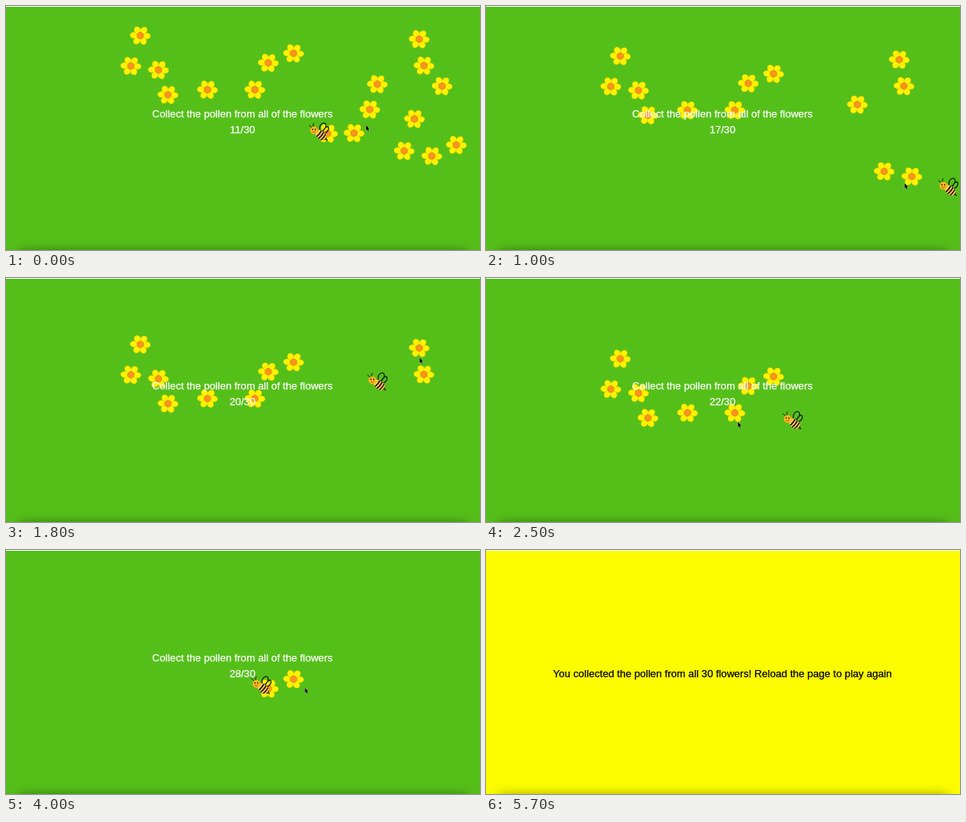
Recreate the animation shown at these times as an HTML page with a canvas. Size 600 by 309 pixels, loop 5.9 s.

```html
<!DOCTYPE html>
<html lang="en">
<head>
<meta charset="utf-8">
<title>Collect the pollen</title>
<style>
html, body { margin: 0; width: 100%; height: 100%; overflow: hidden; background: #55bf19; }
canvas { display: block; width: 600px; height: 309px; }
</style>
</head>
<body>
<canvas id="stage" width="600" height="309"></canvas>
<script>
const ctx = document.getElementById('stage').getContext('2d');
const LOOP = 5900, STEP = 100, WIN = 4200, LEAVE = 5000, GONE = 5500;
const TOTAL = 30;
const DRIFT = 0.0259; // downward flower speed, px per ms
const LEAD = 250;     // how far the pointer runs ahead of the bee, ms

// Each flight visits its flowers in order at a constant speed, then reaches its end.
const flights = [
  { until: 1000, end: [585, 229], flowers: [[407, 161.5], [440.5, 161], [460.5, 131], [517, 143], [552, 101.5], [570, 176]] },
  { until: 1800, end: [470, 131], flowers: [[539, 190], [504, 183.5], [470, 99]] },
  { until: 2500, end: [388, 180], flowers: [[529, 75.5], [523, 42]] },
  { until: 3400, end: [163, 149], flowers: [[315, 106], [255, 106], [205, 112.5], [158, 76]] },
  { until: WIN, end: [378.5, 174.5], flowers: [[170, 37.5], [193, 81], [332, 72], [364, 60]] }
];

const distance = (a, b) => Math.hypot(b.x - a.x, b.y - a.y);
const mix = (a, b, k) => a + (b - a) * k;

function planRoute() {
  const route = [{ t: 0, x: 396, y: 159 }], flowers = [];
  for (const { until, end, flowers: visited } of flights) {
    const start = route[route.length - 1];
    const drift = DRIFT * (start.t + until) / 2;
    const stops = visited.map(([x, y]) => ({ x, y: y + drift }));
    stops.push({ x: end[0], y: end[1] });

    let length = 0, last = start;
    for (const stop of stops) {
      length += distance(last, stop);
      stop.reach = length;
      last = stop;
    }
    for (const stop of stops) stop.t = mix(start.t, until, stop.reach / length);
    visited.forEach(([x, y], i) => flowers.push({ x, y, picked: stops[i].t }));
    route.push(...stops);
  }
  return { route, flowers };
}
const { route, flowers } = planRoute();

function routeAt(t) {
  const i = route.findIndex(stop => stop.t > t);
  if (i < 0) return route[route.length - 1];
  const a = route[i - 1], b = route[i], k = (t - a.t) / (b.t - a.t);
  return { x: mix(a.x, b.x, k), y: mix(a.y, b.y, k) };
}

function pointerAt(t) {
  const p = routeAt(t + LEAD);
  const k = Math.max(0, (t - LEAVE) / (GONE - LEAVE));
  return { x: mix(p.x, 170, k), y: mix(p.y, 156, k) };
}

function at({ x, y }, draw) {
  ctx.save();
  ctx.translate(x, y);
  draw();
  ctx.restore();
}

function oval(x, y, rx, ry, fill, stroke, width = 1) {
  ctx.beginPath();
  ctx.ellipse(x, y, rx, ry, 0, 0, Math.PI * 2);
  ctx.fillStyle = fill;
  ctx.fill();
  if (stroke) { ctx.strokeStyle = stroke; ctx.lineWidth = width; ctx.stroke(); }
}

function line(path, color, width) {
  ctx.strokeStyle = color;
  ctx.lineWidth = width;
  ctx.stroke(new Path2D(path));
}

function flower() {
  ctx.save();
  ctx.scale(1, 0.95);
  ctx.rotate(0.06);
  for (let i = 0; i < 6; i++) {
    oval(8, 0, 5.1, 4.2, '#fff200', 'rgba(190,160,0,.5)', 0.5);
    ctx.rotate(Math.PI / 3);
  }
  ctx.restore();
  oval(0, 0, 4.2, 4.2, '#f9951c', '#d9771a', 0.7);
}

function bee() {
  ctx.lineCap = 'round';
  line('M1 -2C0 -11 9 -14 9 -7C9 -4 5 -1 3 0M5 1C8 -8 14 -8 12 -2C11 1 8 2 6 3', '#0c180a', 1.2);
  line('M-7 -6Q-8 -9 -6.5 -10.5M-9 -5Q-11 -8 -12 -8', '#151505', 1);
  at({ x: 2.5, y: 4.5 }, () => {
    ctx.rotate(0.68);
    line('M7 0H10', '#151505', 1.5);
    oval(0, 0, 8.3, 5.4, '#ffcf55');
    ctx.clip();
    for (let x = -3.5; x < 8; x += 3.5) line(`M${x} -7q2 7 0 14`, '#21130b', 1.7);
  });
  oval(-6, -1.5, 5, 4.8, '#ffc21c', '#d99212', 0.5);
  for (const x of [-8, -4.5]) oval(x, -2.6, 0.8, 1.1, '#261505');
  line('M-8 .5Q-6 2.5 -4 0', '#b9321d', 0.9);
}

function pointer() {
  const arrow = 'M0 0V6.4L1.4 5.2L2.5 7.6L3.5 7.1L2.5 4.8H4.3Z';
  line(arrow, 'rgba(255,255,255,.6)', 0.7);
  ctx.fillStyle = '#000';
  ctx.fill(new Path2D(arrow));
}

function label(text, y, color) {
  ctx.font = '13.1px "Liberation Sans", Arial, sans-serif';
  ctx.textAlign = 'center';
  ctx.fillStyle = ctx.strokeStyle = color;
  ctx.lineWidth = 0.25;
  ctx.fillText(text, 299.3, y);
  ctx.strokeText(text, 299.3, y);
}

function background(color) {
  ctx.fillStyle = color;
  ctx.fillRect(0, 0, 600, 309);
  ctx.save();
  ctx.shadowColor = 'rgba(0,0,0,.5)';
  ctx.shadowBlur = 16;
  ctx.fillStyle = '#000';
  ctx.fillRect(16, 312, 568, 30);
  ctx.restore();
  ctx.fillStyle = '#fff';
  ctx.fillRect(0, 0, 600, 1);
}

function game(t) {
  background('#55bf19');
  const left = flowers.filter(f => t < f.picked);
  for (const { x, y } of left) at({ x, y: y + DRIFT * t }, flower);
  at(routeAt(t), bee);
  label('Collect the pollen from all of the flowers', 141, '#fff');
  label(`${TOTAL - left.length}/${TOTAL}`, 161, '#fff');
}

function win() {
  background('#fdfd00');
  label(`You collected the pollen from all ${TOTAL} flowers! Reload the page to play again`, 161, '#000');
}

function frame() {
  const t = Math.floor(performance.now() % LOOP / STEP) * STEP;
  if (t < WIN) game(t); else win();
  if (t < GONE) at(pointerAt(t), pointer);
  requestAnimationFrame(frame);
}
frame();
</script>
</body>
</html>
```
